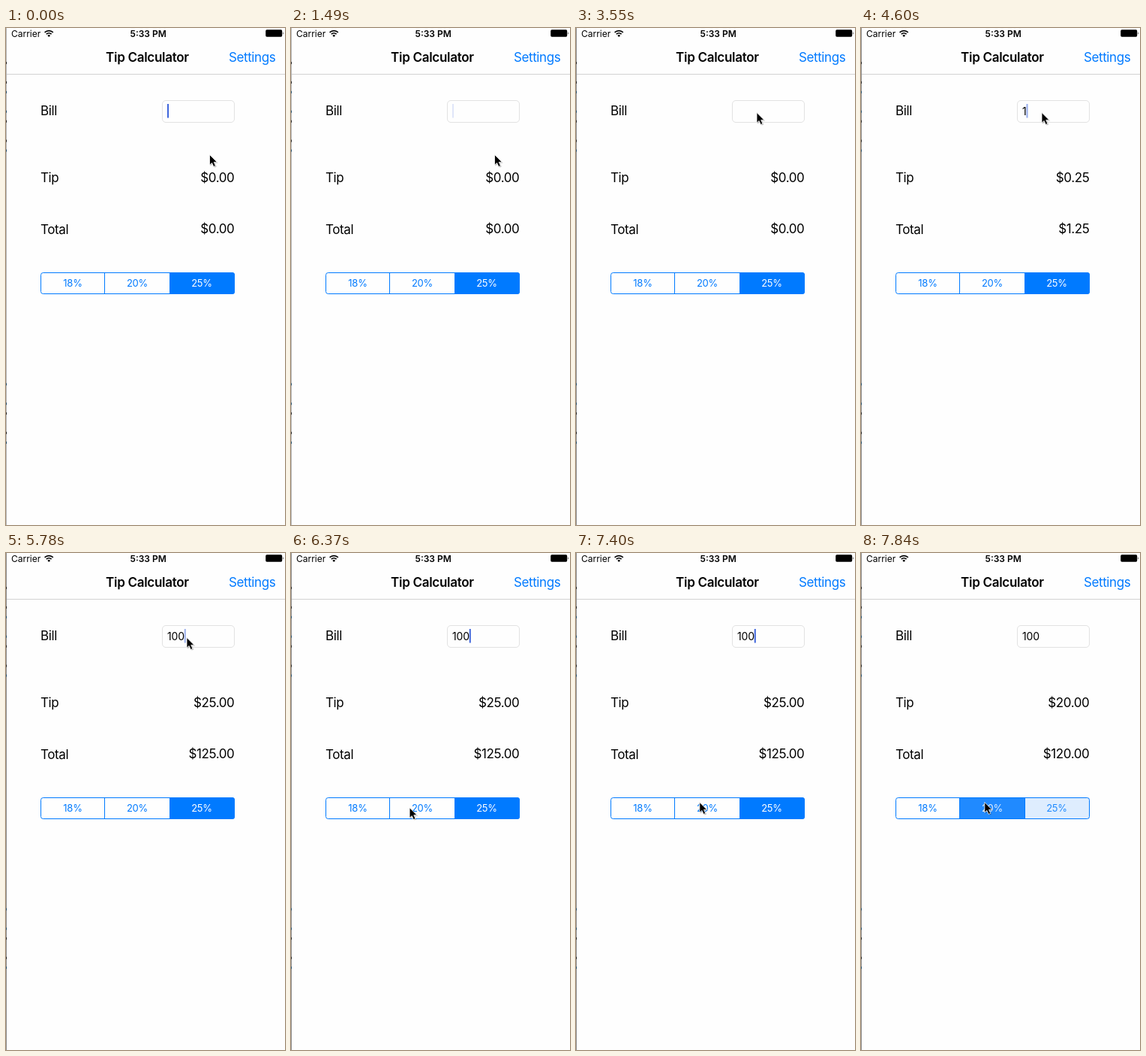
An HTML page that plays this animation: 372x661 px, repeating every 7990 ms.

```html
<!DOCTYPE html>
<html lang="en">
<head>
<meta charset="utf-8">
<title>Tip Calculator</title>
<style>
  html, body { margin: 0; width: 100%; height: 100%; overflow: hidden; background: #fefefe; }
  svg { display: block; width: 100%; height: 100%; }
  text { font-family: Inter, Roboto, "Liberation Sans", sans-serif; font-size: 17px; letter-spacing: -.4px; fill: #000; white-space: pre; }
  .end { text-anchor: end; }
  .mid { text-anchor: middle; }
  .bold { font-weight: 600; }
  .title { letter-spacing: -.3px; }
  .status { font-size: 12px; letter-spacing: 0; }
  .link { fill: #007aff; }
  .field { font-size: 14px; letter-spacing: -.2px; }
  .seg { font-size: 13px; letter-spacing: -.25px; }
</style>
</head>
<body>
<svg viewBox="0 0 372 661">
  <defs>
    <clipPath id="round"><rect x="46" y="325" width="259" height="29" rx="3.5"/></clipPath>
  </defs>
  <rect width="372" height="661" fill="#fefefe"/>

  <!-- window edge with slivers of the text behind it -->
  <rect id="edge" width="1" height="661"/>
  <g id="slivers"></g>

  <!-- status bar -->
  <text class="status" x="7" y="11.5">Carrier</text>
  <g fill="none" stroke="#000" stroke-width="1.7">
    <path d="M51.6 5.9a8 8 0 0 1 11.2 0"/>
    <path d="M53.8 8.2a4.9 4.9 0 0 1 6.8 0"/>
  </g>
  <path d="M57.2 12l-1.9-2a2.8 2.8 0 0 1 3.8 0z"/>
  <text class="status bold mid" x="189.7" y="11.5">5:33 PM</text>
  <rect x="346.2" y="2.3" width="22" height="9.4" rx="1.6"/>
  <path d="M369 5.3q1.5 1.7 0 3.4z"/>

  <!-- navigation bar -->
  <text class="bold mid title" x="188.4" y="45">Tip Calculator</text>
  <text class="link end" x="359.3" y="45">Settings</text>
  <rect x="1" y="61" width="371" height="1" fill="#d2d2d2"/>

  <text x="46" y="116">Bill</text>
  <text x="46" y="205">Tip</text>
  <text x="46" y="273.5">Total</text>
  <rect x="208.5" y="96.5" width="96" height="29" rx="4.5" fill="none" stroke="#e2e2e2"/>
  <text id="bill" class="field" x="215" y="116"></text>
  <rect id="caret" y="101" width="2" height="18.5" fill="#3f66dc"/>
  <text id="tip" class="end" x="304.4" y="204.5"></text>
  <text id="total" class="end" x="304.4" y="272.7"></text>

  <!-- segmented control -->
  <g id="segments" clip-path="url(#round)"></g>
  <path d="M131.5 325V354M218.5 325V354" stroke="#007aff"/>
  <rect x="46.5" y="325.5" width="258" height="28" rx="3" fill="none" stroke="#007aff"/>
  <g id="labels"></g>

  <g id="pointer">
    <path d="M1 1.5V15.4L4.4 12.6 6.6 17.4 9.2 16.4 7.2 11.6H11.2Z" opacity=".25"/>
    <path d="M0 .5V14.2L3.1 11.4 5.3 16.4 7.9 15.3 5.7 10.4H9.9Z" stroke="#fff" stroke-width=".8"/>
  </g>
</svg>
<script>
const LOOP = 7990, FIRST_HOLD = 440, FRAME = 148;
const BLINK = 985, BLINK_START = 164;
const FOCUS = 3255, PRESS = 7690, RELEASE = 7700;
const BILL = "100", KEYS = [3990, 5020, 5170];
const PATH = [
  { t: 2700, x: 271.5, y: 168 },
  { t: 2956, x: 244.5, y: 89 },
  { t: 3250, x: 241, y: 112 },
  { t: 5780, x: 241, y: 112 },
  { t: 6500, x: 149, y: 363 },
  { t: 6804, x: 177.5, y: 293.7 },
  { t: 7100, x: 164.8, y: 331 }
];

const $ = id => document.getElementById(id);
const clamp = v => Math.min(1, Math.max(0, v));
const lerp = (a, b, p) => a + (b - a) * p;
const smooth = p => p * p * (3 - 2 * p);
const money = n => "$" + n.toFixed(2);

function set(el, attrs) {
  for (const key in attrs) el.setAttribute(key, attrs[key]);
}

function add(parent, tag, attrs, content = "") {
  const el = document.createElementNS("http://www.w3.org/2000/svg", tag);
  set(el, attrs);
  el.textContent = content;
  $(parent).append(el);
}

const snap = t => t < FIRST_HOLD ? 0 : t - (t - FIRST_HOLD) % FRAME;

function pointerAt(t) {
  const next = PATH.findIndex(p => p.t > t);
  if (next < 1) return next ? PATH.at(-1) : PATH[0];
  const a = PATH[next - 1], b = PATH[next];
  const p = smooth((t - a.t) / (b.t - a.t));
  return { x: lerp(a.x, b.x, p), y: lerp(a.y, b.y, p) };
}

// Solid after a key press, then fading out and in once per BLINK.
function caretAt(t, lastKey) {
  const age = lastKey ? t - lastKey : t + BLINK_START;
  const phase = age % BLINK;
  const fadeIn = age < BLINK ? 1 : clamp(phase / 120);
  return Math.min(fadeIn, clamp((680 - phase) / 160));
}

["18%", "20%", "25%"].forEach((label, i) => {
  const x = 46 + 86 * i;
  add("segments", "rect", { x, y: 325, width: 87, height: 29, fill: "#007aff" });
  add("labels", "text", { class: "seg mid", x: x + 43, y: 344 }, label);
});

for (let line = 0; line < 40; line++) {
  const inBlock = line < 11 || line > 32;
  if (inBlock && line % 3 != 1)
    add("slivers", "rect", { y: 45 + line * 12.95, width: 1, height: 3, fill: line % 2 ? "#24506e" : "#222" });
}

function draw(t) {
  const pressed = KEYS.filter(key => key <= t);
  const bill = BILL.slice(0, pressed.length);
  $("bill").textContent = bill;
  set($("caret"), {
    x: 215 + $("bill").getComputedTextLength(),
    opacity: caretAt(t, pressed.at(-1))
  });

  const swap = clamp((t - RELEASE) / 160);
  const rate = swap ? .2 : .25;
  $("tip").textContent = money(bill * rate);
  $("total").textContent = money(bill * (1 + rate));

  const tint = t >= PRESS ? .14 : 0;
  [0, Math.max(tint, swap), 1 - swap].forEach((level, i) => {
    set($("segments").children[i], { opacity: level });
    $("labels").children[i].style.fill = `rgb(${255 * level},${lerp(122, 255, level)},255)`;
  });

  const { x, y } = pointerAt(t);
  set($("pointer"), { transform: `translate(${x} ${y})` });
  set($("edge"), { fill: t < FOCUS ? "#b4b4b4" : "#8c8c8c" });
}

const start = performance.now();
function tick() {
  draw(snap((performance.now() - start) % LOOP));
  requestAnimationFrame(tick);
}
tick();
</script>
</body>
</html>
```
